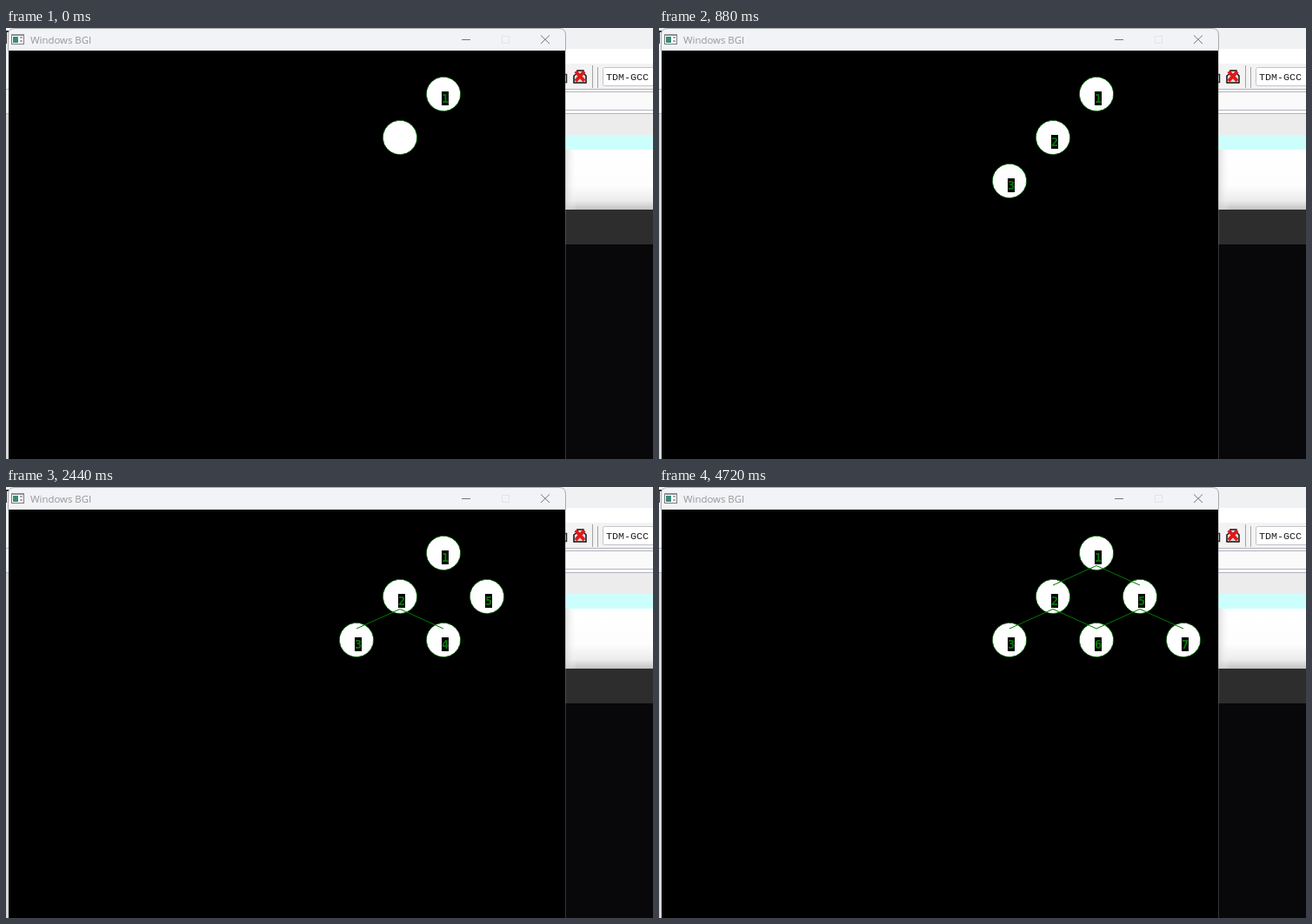
Animation of 744 by 496 pixels, one loop 5720 ms. Source, as an HTML page:

```html
<!DOCTYPE html>
<html lang="en">
<head>
<meta charset="utf-8">
<title>Tree drawing</title>
<style>
  html, body { margin: 0; width: 100%; height: 100%; overflow: hidden; background: #000; }
  svg { display: block; width: 744px; height: 496px; }
  .title { font: 11.4px "Open Sans", "Noto Sans", sans-serif; fill: #959698; }
  .combo { font: 11.7px "Liberation Mono", monospace; fill: #222; }
  .digit { font: bold 13.5px "DejaVu Sans Mono", monospace; fill: #007a00; text-anchor: middle; }
  .green { fill: none; stroke: #007a00; }
  .rim { stroke-dasharray: 4 2; }
  .disc { fill: #fff; }
</style>
</head>
<body>
<svg id="stage" viewBox="0 0 744 496">
  <defs>
    <linearGradient id="shadeX">
      <stop offset="0" stop-color="#d0d0d0" stop-opacity=".7"/>
      <stop offset="1" stop-color="#fff" stop-opacity="0"/>
    </linearGradient>
    <linearGradient id="shadeY" x2="0" y2="1">
      <stop offset="0" stop-color="#fff"/>
      <stop offset=".6" stop-color="#fdfdfd"/>
      <stop offset=".85" stop-color="#ececec"/>
      <stop offset="1" stop-color="#c2c2c2"/>
    </linearGradient>
  </defs>

  <!-- editor behind the window -->
  <g id="editor">
    <path fill="#f0f1f3" d="M0 0H744V209H0z"/>
    <path fill="#fff" d="M640 24H744V41H640z"/>
    <path fill="#f3f3f3" d="M640 41H744V70H640z"/>
    <path fill="#fafafa" d="M640 71H744V98H640z"/>
    <path fill="#ececec" d="M640 99H744V123H640z"/>
    <path fill="#ccfffc" d="M640 123H744V140H640z"/>
    <path fill="url(#shadeY)" d="M640 140H744V209H640z"/>
    <path fill="url(#shadeX)" d="M643 140H657V209H643z"/>
    <path fill="#2d2d2d" d="M640 209H744V249H640z"/>
    <path fill="#08080b" d="M640 249H744V496H640z"/>
    <path fill="#d6d6d6" d="M0 99H3V496H0z"/>
    <path fill="#333" d="M0 3H3V5H1V18H0z"/>
    <path fill="none" stroke="#b4b4c0" d="M0 70.5H3M643 70.5H744M0 98.5H3M643 98.5H744M643 73.5H744M643 94.5H744"/>
    <path fill="none" stroke="#a4a4a8" d="M674.5 43V69M680.5 45V69"/>
    <path fill="none" stroke="#222" stroke-width="1.5" d="M642 53.5H644.5V62.5H642"/>
    <path fill="#e4dcdc" stroke="#111" stroke-width="1.5" d="M653 63V55L657 52V49H664V52L667 55V63z"/>
    <path fill="none" stroke="#e01818" stroke-width="4" d="M655 50L665 61M665 50L655 61"/>
    <rect x="686.5" y="45.5" width="70" height="21" rx="2" fill="#fff" stroke="#c4c4cc"/>
    <text class="combo" x="690" y="60">TDM-GCC</text>
  </g>

  <!-- window frame -->
  <path fill="#000" d="M3 26H643V496H3z"/>
  <path fill="#f1f3f6" stroke="#a8a9ac" d="M2.5 26V8Q2.5 .5 10 .5H636Q643.5 .5 643.5 8V26"/>
  <path fill="none" stroke="#888" stroke-opacity=".35" d="M643.5 26V496"/>
  <g>
    <rect x="6.5" y="7.5" width="14" height="11" fill="#fff" stroke="#77797c"/>
    <path fill="#8c8e92" d="M6 7H21V9H6z"/>
    <path fill="#3d8a78" d="M8 10H14V17H8z"/>
    <path fill="#a9aaae" d="M16 10H19V12H16zM16 14H19V16H16z"/>
  </g>
  <text class="title" x="28" y="18">Windows BGI</text>
  <g fill="none">
    <path stroke="#757678" d="M524 13.5H534"/>
    <path stroke="#e2e4e7" d="M570.5 9.5H578.5V17.5H570.5z"/>
    <path stroke="#757678" d="M615 8.5L625 18M625 8.5L615 18"/>
  </g>
  <g id="tree"></g>
</svg>

<script>
const LOOP = 5720, STEP = 200;
const tree = document.getElementById('tree');
const parts = [];

function add(tag, attrs, from, until = LOOP, text = '') {
  const el = document.createElementNS('http://www.w3.org/2000/svg', tag);
  for (const key in attrs) el.setAttribute(key, attrs[key]);
  el.textContent = text;
  tree.append(el);
  parts.push({ el, from, until });
}

// A thin outline first, then a white disc with a broken rim.
function node(x, y, at) {
  const ring = { cx: x, cy: y, r: 19.5 };
  add('circle', { class: 'green', ...ring }, at, at + STEP);
  add('circle', { class: 'disc', ...ring }, at + STEP);
  add('circle', { class: 'green rim', ...ring }, at + STEP);
}

// Filling again clears the label's box but leaves its digit.
function label(x, y, digit, from, boxEnd, end) {
  add('rect', { x: x - 2, y: y - 3, width: 8, height: 16 }, from, boxEnd);
  add('text', { class: 'digit', x: x + 2, y: y + 10 }, from, end, digit);
}

function edge(x, y, side, at) {
  add('path', { class: 'green', d: `M${x} ${y + 14.5}L${x + side * 50} ${y + 37}` }, at);
}

node(503, 76, -600);
node(453, 126, -200);
node(403, 176, 440);
node(503, 176, 1040);
node(553, 126, 2040);
node(603, 176, 3240);

label(503, 76, 1, 0);
label(453, 126, 2, 240);
label(403, 176, 3, 840);
label(503, 176, 4, 1440, 2840, 3040);
label(553, 126, 5, 2440);
label(503, 176, 6, 3040);
label(603, 176, 7, 3640);

edge(453, 126, -1, 1640);
edge(453, 126, 1, 1840);
edge(553, 126, -1, 4040);
edge(553, 126, 1, 4240);
edge(503, 76, -1, 4480);
edge(503, 76, 1, 4680);

const start = performance.now();
function draw() {
  const t = (performance.now() - start) % LOOP;
  for (const { el, from, until } of parts)
    el.style.visibility = t >= from && t < until ? 'visible' : 'hidden';
  requestAnimationFrame(draw);
}
draw();
</script>
</body>
</html>
```
